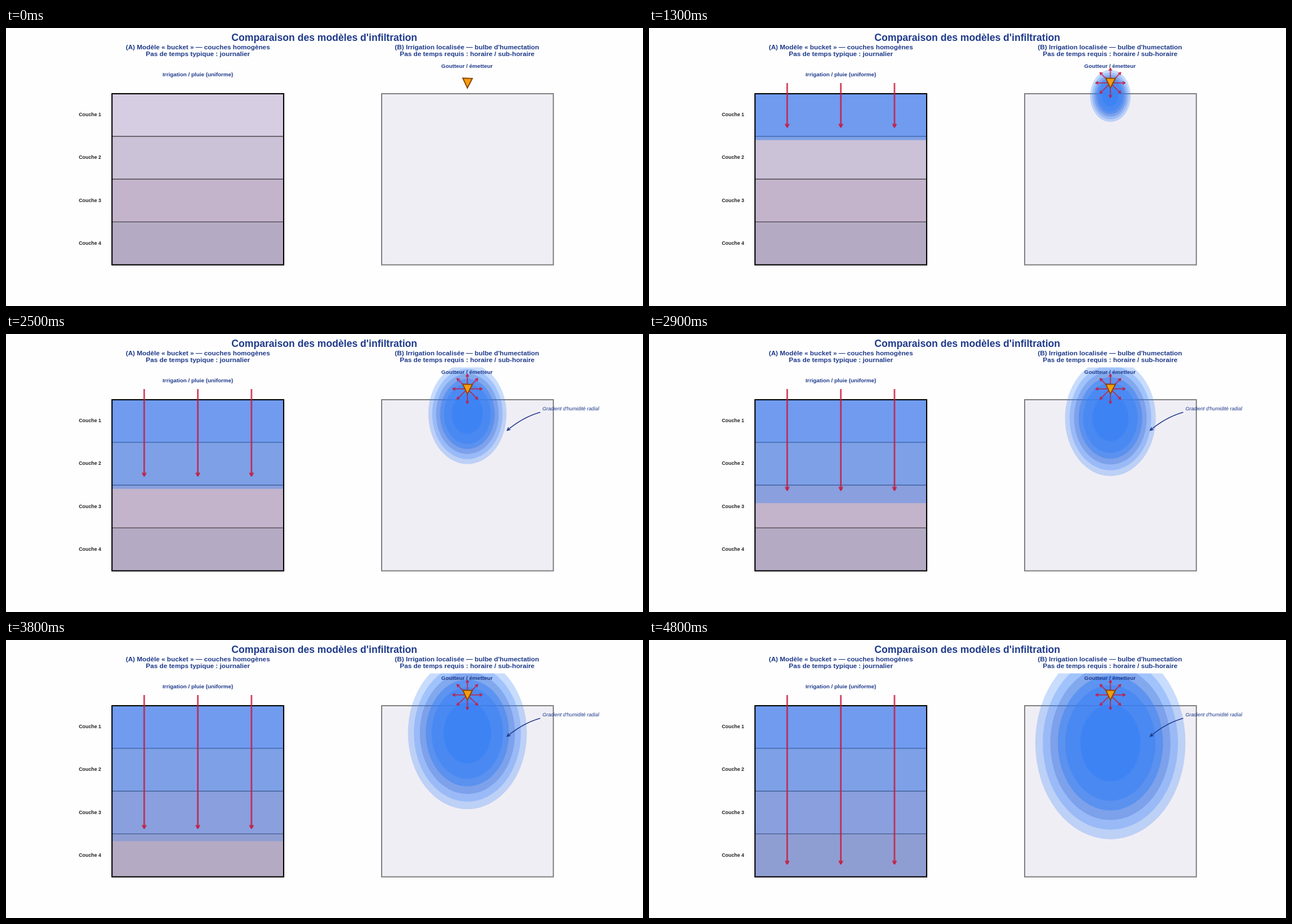
These frames come from a looping animation (1131 by 495 pixels, 6 s). An HTML page:

```html
<!DOCTYPE html>
<html lang="fr">
<head>
<meta charset="utf-8">
<title>Comparaison des modèles d'infiltration</title>
<style>
  html, body { margin: 0; width: 100%; height: 100%; overflow: hidden; background: #fefefe; }
  svg { display: block; width: 1131px; height: 495px; }
  text { font: bold 11.75px "Liberation Sans", Arial, sans-serif; fill: #1e3a8a; text-anchor: middle; }
  text.title { font-size: 17.6px; }
  text.label { font-size: 9.86px; }
  text.layer { font-size: 8.85px; fill: #222; text-anchor: start; }
  text.note { font: italic 8.85px "Liberation Sans", Arial, sans-serif; text-anchor: start; }
  .arrow { fill: none; stroke: #c8193c; stroke-opacity: .8; stroke-linejoin: round; }
  .head { stroke-linecap: round; }
  #flow { stroke-width: 2.9; }
  #rays { stroke-width: 1.9; }
  #note path { fill: none; stroke: #1e3a8a; stroke-width: 1.5; stroke-linecap: round; stroke-linejoin: round; }
</style>
</head>
<body>
<svg viewBox="0 0 1131 495">
  <defs>
    <clipPath id="axes"><rect x="600" y="59.5" width="440" height="400"/></clipPath>
  </defs>

  <g id="soil"></g>
  <g id="water" fill="#3b82f6"></g>
  <rect x="188.2" y="117" width="304.8" height="304.7" fill="none" stroke="#000" stroke-width="2.1"/>
  <g id="flow" class="arrow"></g>

  <rect x="667" y="117" width="304.8" height="304.7" fill="#f0eef5" stroke="#7f7f7f" stroke-width="2"/>
  <g id="bulb" clip-path="url(#axes)"></g>
  <g id="rays" class="arrow"></g>
  <path d="M811 89.2L828 89.8L819.2 106.8Z" fill="#f59e0b" stroke="#8a450c" stroke-width="1.9"/>
  <g id="note">
    <path d="M948 139.5Q917 148.5 889.6 171.8M895.2 170.2L889.6 171.8L892 166.6"/>
    <text class="note" x="952.6" y="136">Gradient d'humidité radial</text>
  </g>

  <text class="title" x="565.2" y="22.6">Comparaison des modèles d'infiltration</text>
  <text x="340.7" y="37.6">(A) Modèle « bucket » — couches homogènes</text>
  <text x="340.7" y="49.6">Pas de temps typique : journalier</text>
  <text x="818.4" y="37.6">(B) Irrigation localisée — bulbe d'humectation</text>
  <text x="818.8" y="49.6">Pas de temps requis : horaire / sub-horaire</text>
  <text class="label" x="340.7" y="86.4">Irrigation / pluie (uniforme)</text>
  <text class="label" x="818.4" y="70.8">Goutteur / émetteur</text>
</svg>
<script>
const UNIT = 38.1, TOP = 117, LEFT = 188.2, SIDE = 8 * UNIT, LAYER = 2 * UNIT;
const DRIP = { x: 819.2, y: 97.7 };
const LAST = 48, STEP = 100, LOOP = 6000;

const $ = id => document.getElementById(id);
function add(parent, tag, attrs) {
  const el = document.createElementNS('http://www.w3.org/2000/svg', tag);
  set(el, attrs);
  parent.append(el);
  return el;
}
function set(el, attrs) {
  for (const k in attrs) el.setAttribute(k, attrs[k]);
}
const show = (el, on) => el.setAttribute('visibility', on ? 'visible' : 'hidden');

// Soil layers, their labels and the water filling each one
const soil = ['#d6cde2', '#cbc2d7', '#c3b4cc', '#b4aac3'];
const wet = [.65, .53, .42, .3];
soil.forEach((fill, i) => {
  const y = TOP + i * LAYER;
  add($('soil'), 'rect', { x: LEFT, y, width: SIDE, height: LAYER, fill });
  add($('soil'), 'text', { class: 'layer', x: 129.2, y: y + 40.2 }).textContent = `Couche ${i + 1}`;
});
for (let i = 1; i < 4; i++) {
  add($('soil'), 'path', { d: `M${LEFT} ${TOP - .3 + i * LAYER}h${SIDE}`, stroke: '#5a555c', 'stroke-width': 1.6 });
}
const water = wet.map((a, i) => add($('water'), 'rect', {
  x: LEFT, y: TOP + i * LAYER, width: SIDE, 'fill-opacity': a
}));

const flow = [1.5, 4, 6.5].map(k => ({
  x: LEFT + k * UNIT,
  line: add($('flow'), 'path', {}),
  head: add($('flow'), 'path', { class: 'head' })
}));

// Wetting bulb: relative size, colour, opacity
const bulb = [
  [1, '#3b82f6', .28], [.9, '#3b82f6', .28], [.8, '#3460c8', .28],
  [.7, '#3b82f6', .5], [.6, '#3b82f6', .5], [.4, '#3b82f6', .8]
].map(([size, fill, a]) => ({
  size, el: add($('bulb'), 'ellipse', { cx: DRIP.x, fill, 'fill-opacity': a })
}));

for (let i = 0; i < 8; i++) {
  const g = add($('rays'), 'g', { transform: `translate(${DRIP.x} ${DRIP.y}) rotate(${i * 45})` });
  add(g, 'path', { d: 'M3 0H25.6' });
  add(g, 'path', { class: 'head', d: 'M22.2 -2.1L26 0L22.2 2.1' });
}

function draw(ms) {
  const p = Math.min(LAST, Math.floor(ms % LOOP / STEP)) / LAST;
  const depth = p * SIDE, tip = TOP + depth - 23.2;

  water.forEach((el, i) => {
    el.setAttribute('height', Math.max(0, Math.min(LAYER, depth - i * LAYER)));
  });
  for (const { x, line, head } of flow) {
    set(line, { d: `M${x} 98V${tip}` });
    set(head, { d: `M${x - 2.6} ${tip - 4.6}L${x} ${tip}L${x + 2.6} ${tip - 4.6}` });
  }
  const rx = 3.5 * UNIT * p, ry = 4.5 * UNIT * p;
  for (const { size, el } of bulb) {
    set(el, { cy: DRIP.y + ry / 2, rx: rx * size, ry: ry * size });
  }
  show($('flow'), p > .1);
  show($('rays'), p > .2);
  show($('note'), p > .5);
}

function tick(now) {
  draw(now);
  requestAnimationFrame(tick);
}
draw(0);
requestAnimationFrame(tick);
</script>
</body>
</html>
```
